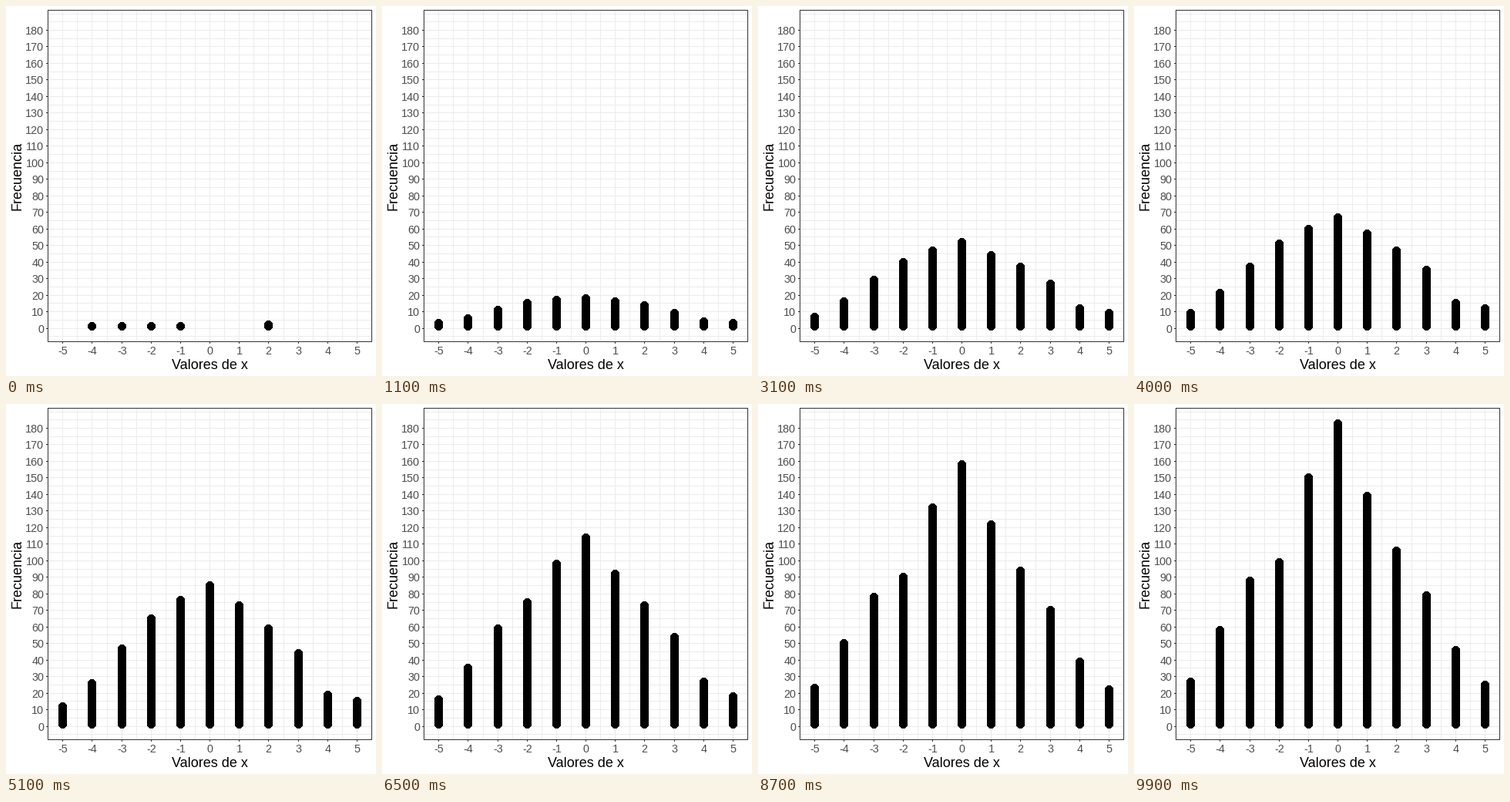
A matplotlib script that plays this animation: 480 by 480 pixels, repeating every 10000 ms.

```python
import numpy as np
import matplotlib.pyplot as plt
from matplotlib.animation import FuncAnimation
from matplotlib.patches import Polygon

SIZE, FRAMES = 480, 100
PT = 0.9  # points per pixel at 80 dpi
LEFT, RIGHT, TOP, BOTTOM = 54.7, 474.5, 5.5, 435.5
Y_MIN, Y_MAX = -8.1, 192.1
RADIUS = 4.9  # unsmoothed edges fill every touched pixel, giving 11 px dots
GRID, EDGE, TICK_TEXT = "#EBEBEB", "#333333", "#4D4D4D"
XS = np.arange(-5, 6)

# Stack heights at the start, middle and end; growth is linear in between.
START = [0, 1, 1, 1, 1, 0, 0, 2, 0, 0, 0]
MIDDLE = [12, 26, 47, 65, 76, 85, 73, 59, 44, 19, 15]
END = [27, 58, 88, 99, 150, 183, 139, 106, 79, 46, 25]
MIDDLE_AT = 51


def px(x):
    return np.floor(LEFT + (x + 5.5) * (RIGHT - LEFT) / 11)


def py(y):
    return np.floor(BOTTOM - (y - Y_MIN) * (BOTTOM - TOP) / (Y_MAX - Y_MIN))


def heights(i):
    at = [0, MIDDLE_AT, FRAMES - 1]
    return [round(np.interp(i, at, h)) for h in zip(START, MIDDLE, END)]


fig = plt.figure(figsize=(6, 6), dpi=80, facecolor="white")
ax = fig.add_axes([0, 0, 1, 1])
ax.set(xlim=(0, SIZE), ylim=(SIZE, 0))
ax.axis("off")


def line(xs, ys, color, z=1):
    ax.plot(np.floor(xs), np.floor(ys), color=color, lw=PT, zorder=z, snap=True,
            solid_capstyle="projecting", solid_joinstyle="miter")


def label(x, y, text, size, color, ha="center", rotation=0):
    ax.text(x, y, text, fontsize=size * PT, color=color, ha=ha, va="baseline",
            rotation=rotation, rotation_mode="anchor", family="Liberation Sans")


for x in np.arange(-5, 5.1, 0.5):
    line([px(x)] * 2, [TOP, BOTTOM], GRID)
for y in range(-5, 191, 5):
    line([LEFT, RIGHT], [py(y)] * 2, GRID)
line([LEFT, RIGHT, RIGHT, LEFT, LEFT], [TOP, TOP, BOTTOM, BOTTOM, TOP], EDGE, 5)

for x in XS:
    line([px(x)] * 2, [BOTTOM, BOTTOM + 2], EDGE, 5)
    label(px(x) + 0.5, 452, str(x), 14.4, TICK_TEXT)
for y in range(0, 181, 10):
    line([LEFT - 2, LEFT], [py(y)] * 2, EDGE, 5)
    label(49.3, py(y) + 6, str(y), 14.4, TICK_TEXT, ha="right")
label(264, 471, "Valores de x", 18, "black")
label(20, 220, "Frecuencia", 18, "black", rotation=90)

ARC = np.linspace(0, np.pi, 40)


def capsule(x, n):
    """Outline of n dots stacked from 1 up to n."""
    cap = RADIUS * np.column_stack([np.cos(ARC), -np.sin(ARC)])
    upper = cap + [px(x) + 0.5, py(n) + 0.5]
    lower = [px(x) + 0.5, py(1) + 0.5] - cap
    return np.vstack([upper, lower])


bars = [Polygon(capsule(x, 1), facecolor="black", lw=0, antialiased=False,
                snap=False, zorder=3) for x in XS]
for bar in bars:
    ax.add_patch(bar)


def draw(i):
    for x, n, bar in zip(XS, heights(i), bars):
        bar.set_visible(n > 0)
        bar.set_xy(capsule(x, max(n, 1)))
    return bars


anim = FuncAnimation(fig, draw, frames=FRAMES, interval=100, repeat=True, blit=False)
plt.show()
```
